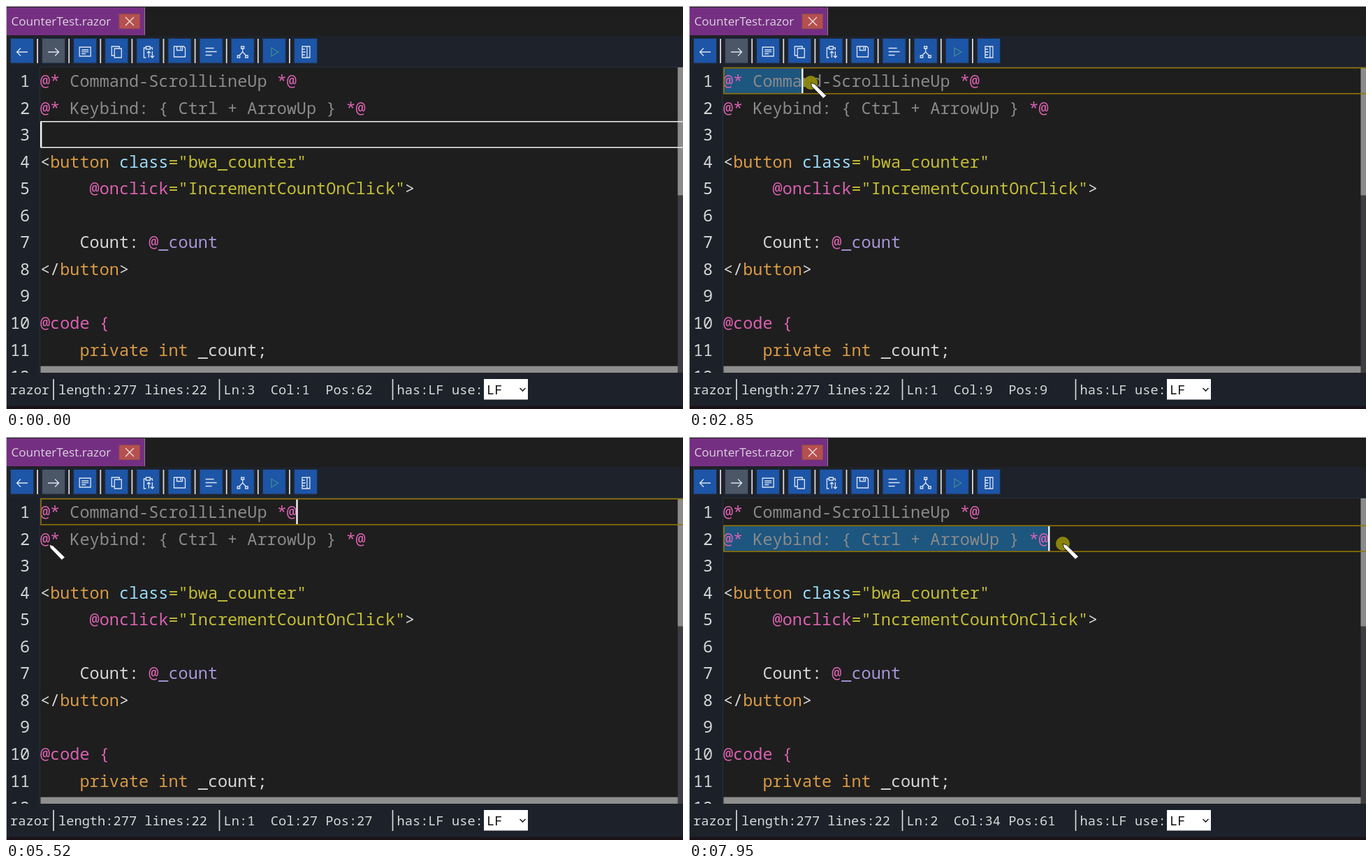
Write an HTML page that moves like this. It is 969 by 578 pixels and loops after 8000 ms.

```html
<!DOCTYPE html>
<html lang="en">
<head>
<meta charset="utf-8">
<title>Code editor selection</title>
<style>
  html, body { margin: 0; width: 100%; height: 100%; overflow: hidden; background: #1e1e1e; }
  svg { display: block; width: 969px; height: 578px; }
  text { white-space: pre; font-family: "Noto Sans Mono", "DejaVu Sans Mono", monospace; font-variant-ligatures: none; }
  .code { font-size: 23.53px; fill: #d6d6d6; }
  .status { font-size: 18.7px; fill: #d8d8d8; }
  .tab { font: 17.1px "Open Sans", "Noto Sans", sans-serif; fill: #dcd3de; }
  .icon { fill: none; stroke: #dce4ee; stroke-width: 1.3; }
</style>
</head>
<body>
<svg id="stage" viewBox="0 0 969 578">
  <defs><clipPath id="editorClip"><rect y="87" width="969" height="439"/></clipPath></defs>
  <rect width="969" height="578" fill="#1e1e1e"/>
  <rect y="43" width="969" height="45" fill="#1e222a"/>
  <rect y="87" width="49" height="440" fill="#1c2129"/>
  <path d="M48.5 87V527M48 87.5H969" stroke="#25323d" fill="none"/>

  <rect x="1" y="2" width="197" height="40" fill="#752f82"/>
  <path d="M198.5 2V42" stroke="#8d7b91"/>
  <text class="tab" x="7.5" y="28">CounterTest.razor</text>
  <rect x="162" y="11.5" width="29.5" height="21" fill="#b5504f" stroke="#8d4a50"/>
  <path d="M171 16l12 12M183 16l-12 12" stroke="#efdede" stroke-width="1.4"/>
  <g id="toolbar"></g>

  <g clip-path="url(#editorClip)">
    <rect id="selection" x="49" height="35.5" fill="#1d567f"/>
    <g id="lines"></g>
  </g>
  <rect x="961.5" y="88" width="7.5" height="438" fill="#3e3e42"/>
  <rect x="961.5" y="88" width="7.5" height="183.5" fill="#8b8b8b"/>
  <rect x="49.5" y="516.5" width="912" height="9.5" fill="#8e8e8e"/>
  <rect id="rowBox" x="50" width="940" height="37" fill="none" stroke-width="1.6"/>
  <rect id="caret" width="2.4" height="35.5" fill="#f4f4f4"/>

  <rect y="527" width="969" height="47" fill="#1c212a"/>
  <rect y="574" width="969" height="4" fill="#1b1217"/>
  <path d="M68 535V565M305.5 535V565M553.5 535V565" stroke="#d8d8d8" stroke-width="1.7"/>
  <text class="status" x="6" y="556.5">razor</text>
  <text class="status" x="75" y="556.5">length:277 lines:22</text>
  <text class="status" x="311.5" y="556.5" id="position"></text>
  <text class="status" x="559.5" y="556.5">has:LF use:</text>
  <rect x="684" y="535" width="63" height="29.5" fill="#fff"/>
  <text class="status" x="688" y="556.5" style="fill:#111">LF</text>
  <path d="M735.5 548l4 4 4-4" fill="none" stroke="#222" stroke-width="1.6"/>
  <path d="M0 .5H969M.5 0V578" stroke="#c4c4c4" fill="none"/>

  <g id="pointer">
    <circle id="press" r="10" fill="#918b0c" fill-opacity=".94"/>
    <path d="M0 0L5.500 2 22.500 18.500 18 22.500 1.500 5.500Z" fill="#fff" stroke="#111" stroke-width=".9"/>
  </g>
</svg>
<script>
const $ = id => document.getElementById(id);
const LOOP = 8000, LEFT = 49, CHAR = 14.118, ROW = 38.55;

const PINK = '#d961b0', GREY = '#8a8a8a', ORANGE = '#d99a45', BLUE = '#9cdcfe',
      STRING = '#c3bd35', PURPLE = '#a895d8', PLAIN = '#d6d6d6';

const source = [
  [['@*', PINK], [' Command-ScrollLineUp ', GREY], ['*@', PINK]],
  [['@*', PINK], [' Keybind: { Ctrl + ArrowUp } ', GREY], ['*@', PINK]],
  [],
  [['<', PLAIN], ['button', ORANGE], [' class', BLUE], ['="bwa_counter"', STRING]],
  [['     @onclick', PINK], ['="IncrementCountOnClick"', STRING], ['>', PLAIN]],
  [],
  [['    Count: ', PLAIN], ['@', PINK], ['_count', PURPLE]],
  [['</', PLAIN], ['button', ORANGE], ['>', PLAIN]],
  [],
  [['@code {', PINK]],
  [['    private int', ORANGE], [' _count;', PLAIN]],
  []
];
const lengths = source.map(line => line.reduce((n, [s]) => n + s.length, 0));
const escapeText = s => s.replace(/</g, '&lt;').replace(/>/g, '&gt;');

$('lines').innerHTML = source.map((line, i) => {
  const y = 116 + ROW * i;
  const spans = line.map(([s, color]) => `<tspan fill="${color}">${escapeText(s)}</tspan>`).join('');
  return `<text class="code" x="6" y="${y}">${String(i + 1).padStart(2)}</text>` +
         `<text class="code" x="${LEFT}" y="${y}">${spans}</text>`;
}).join('');

const icons = [
  'M25 20H9.5M15 14.5L9.5 20l5.5 5.5',
  'M9 20H24.5M19 14.5L24.5 20l-5.5 5.5',
  'M9 13H25V26H9ZM12 17H22M12 19.7H22M12 22.5H18',
  'M14 15H24V28H14ZM21 15V12H10V25H14',
  'M14 28H11V14H14M20 14H23V17M14 12H20V16H14ZM18 28V19M15.5 21.5L18 19l2.5 2.5M23 19V28M20.5 25.5L23 28l2.5-2.5',
  'M9 12H23L25 14V27H9ZM13 12V17.5H21V12M18.5 13V16',
  'M9 14.5H21M9 19.5H25M9 24.5H18',
  'M17 14V20L12 25M17 20L22 25M15 12H19V15H15ZM9.5 25H13V28H9.5ZM21 25H24.5V28H21Z',
  'M13 14L23 20 13 26Z',
  'M12 12H23V28H12ZM12 16H16M12 20H17M12 24H16M19 12V28'
];
$('toolbar').innerHTML = icons.map((d, i) => {
  const x = 6 + 45.1 * i;
  const fill = i === 1 ? '#4b5666' : '#1d55a7';
  const stroke = i === 8 ? ' style="stroke:#3d8a8f"' : '';
  const divider = i ? `<path d="M${x - 6} 47V82" stroke="#dadada" stroke-width="1.8"/>` : '';
  return divider + `<g transform="translate(${x} 46)">` +
    `<rect x=".5" y=".5" width="33" height="35.5" fill="${fill}" stroke="#202f45"/>` +
    `<path class="icon" d="${d}"${stroke}/></g>`;
}).join('');

// time, x, y of the pointer tip
const path = [
  [130, 699, 534], [500, 330, 330], [900, 27, 143], [970, 24, 137], [1300, 22, 112],
  [1600, 25, 104], [1830, 31, 103], [2370, 31, 103], [2850, 174, 110], [3140, 252, 114],
  [3980, 404, 117], [4050, 426, 118], [4520, 462, 127], [4980, 462, 127],
  [5250, 240, 146], [5520, 62, 154], [5740, 38, 151], [5850, 34, 150], [6200, 36, 150],
  [6570, 116, 154], [7050, 289, 157], [7390, 383, 156], [7950, 535, 153]
];
const presses = [[1630, 1700], [1830, 1900], [2100, 4780], [5950, LOOP]];

function pointerAt(t) {
  const next = path.findIndex(p => p[0] > t);
  if (next < 0) return path[path.length - 1].slice(1);
  if (next === 0) return path[0].slice(1);
  const [t0, x0, y0] = path[next - 1], [t1, x1, y1] = path[next];
  const k = (t - t0) / (t1 - t0);
  return [x0 + (x1 - x0) * k, y0 + (y1 - y0) * k];
}

// zero-based row and column, plus whether the text before the caret is selected
function editorAt(t, x) {
  const dragColumn = row => Math.max(0, Math.min(lengths[row], Math.floor((x - LEFT - 1) / CHAR)));
  if (t < 1630) return { row: 2, col: 0, selected: false };
  if (t < 1830) return { row: 0, col: 0, selected: false };
  if (t < 2100) return { row: 0, col: 2, selected: true };
  if (t < 4980) return { row: 0, col: dragColumn(0), selected: true };
  if (t < 5950) return { row: 0, col: lengths[0], selected: false };
  return { row: 1, col: dragColumn(1), selected: true };
}

function set(id, attrs) {
  for (const name in attrs) $(id).setAttribute(name, attrs[name]);
}

function render(t) {
  const [x, y] = pointerAt(t);
  const { row, col, selected } = editorAt(t, x);
  const top = 88.7 + ROW * row;
  const offset = lengths.slice(0, row).reduce((n, length) => n + length + 1, 0);

  set('rowBox', { y: top, stroke: row === 2 ? '#e6e6e6' : '#937506' });
  set('caret', { x: LEFT + CHAR * col - (col ? .8 : 0), y: top + .8 });
  set('selection', { y: top + .8, width: selected ? CHAR * col : 0 });
  $('position').textContent =
    `Ln:${row + 1}`.padEnd(6) + `Col:${col + 1}`.padEnd(7) + `Pos:${offset + col + 1}`;

  set('pointer', { transform: `translate(${x} ${y})`, visibility: t < 130 ? 'hidden' : 'visible' });
  set('press', { opacity: presses.some(([from, to]) => t >= from && t < to) ? 1 : 0 });
}

const start = performance.now();
function tick() {
  render((performance.now() - start) % LOOP);
  requestAnimationFrame(tick);
}
tick();
</script>
</body>
</html>
```
